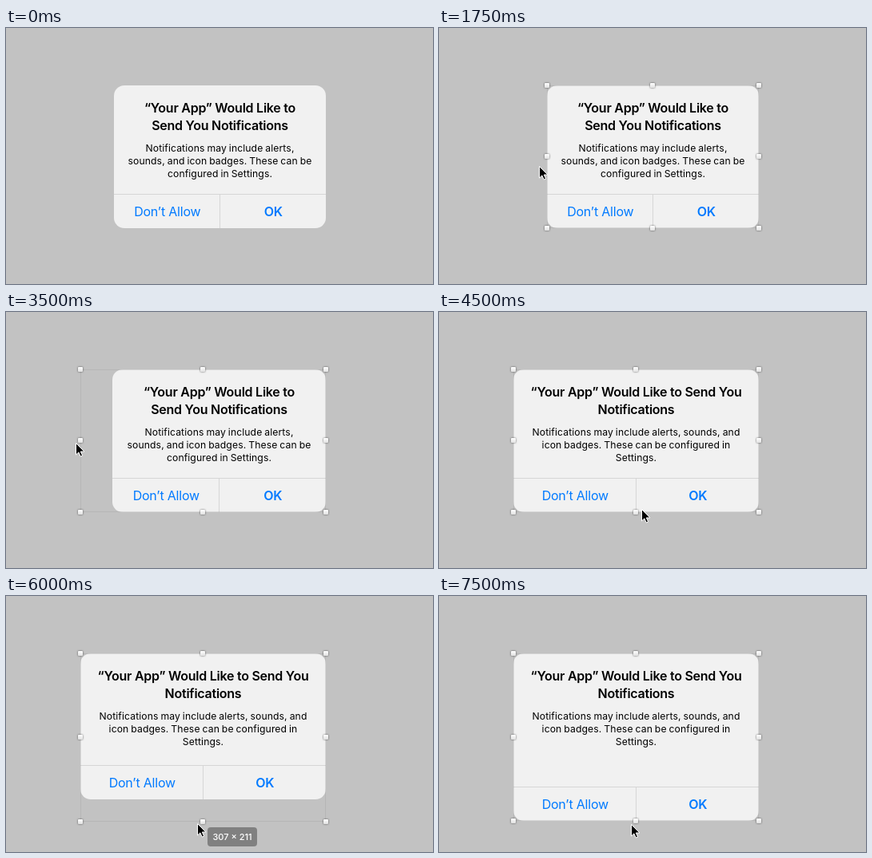
Recreate the animation shown at these times as an HTML page. Size 534 by 321 pixels, loop 8000 ms.

```html
<!DOCTYPE html>
<html lang="en">
<head>
<meta charset="utf-8">
<title>Resizing an alert</title>
<style>
  html, body { margin: 0; width: 100%; height: 100%; overflow: hidden; background: #c2c2c2; }
  svg { display: block; width: 534px; height: 321px; }
  text { font-family: Inter, Roboto, sans-serif; text-anchor: middle; }
  .title { font-size: 16px; font-weight: 600; letter-spacing: -.25px; }
  .body { font-size: 12.2px; letter-spacing: .1px; word-spacing: -.6px; }
  .button { font-size: 16px; letter-spacing: -.22px; fill: #007aff; }
  .strong { font-weight: 600; }
  .size { font-size: 11px; font-weight: 500; fill: #fff; }
  .rule { stroke: #d6d6d6; }
  .outline { fill: none; stroke: #999; stroke-opacity: .3; }
  .handle { fill: url(#shine); filter: drop-shadow(.5px .5px .8px #0009); }
  .cursor { fill: #000; stroke: #fff; stroke-linejoin: round; }
</style>
</head>
<body>
<svg viewBox="0 0 534 321">
  <defs>
    <linearGradient id="shine" x2="0" y2="1">
      <stop stop-color="#fff"/><stop offset="1" stop-color="#e0e0e0"/>
    </linearGradient>
  </defs>
  <g id="scene"></g>
</svg>
<script>
const LOOP = 8000, TOP = 72, RIGHT = 400;
const scene = document.getElementById('scene');

// Each entry overrides the pose before it.
// left/bottom: selection edges, cardLeft/cardBottom: the alert, which redraws late
const changes = [
  [0, { left: 135, bottom: 251, cardLeft: 135, cardBottom: 251 }],
  [500, { cursor: [487, 208] }],
  [750, { cursor: [418, 204] }],
  [1000, { cursor: [318, 198] }],
  [1250, { cursor: [272, 193], selected: true }],
  [1500, { cursor: [199, 179] }],
  [1750, { cursor: [125, 173] }],
  [2000, { cursor: [127, 165] }],
  [2500, { cursor: [126, 164], left: 133, label: true }],
  [2750, { cursor: [106, 164], left: 113, topLeft: 133 }],
  [3000, { cursor: [88, 164], left: 95 }],
  [3250, { cursor: [87, 164], left: 93, topLeft: 0 }],
  [3500, { cardLeft: 133, label: false }],
  [3750, { cursor: [92, 170], cardLeft: 93 }],
  [4000, { cursor: [142, 206] }],
  [4250, { cursor: [216, 238] }],
  [4500, { cursor: [253, 247] }],
  [4750, { cursor: [242, 251] }],
  [5000, { cursor: [240, 254] }],
  [5500, { cursor: [239, 257], bottom: 255, cardBottom: 255, label: true }],
  [5750, { cursor: [239, 275], bottom: 273 }],
  [6000, { cursor: [239, 285], bottom: 283 }],
  [6500, { cursor: [240, 286], bottom: 282 }],
  [6750, { cardBottom: 282 }],
  [7000, { label: false }]
];

const text = (kind, x, y, words) => `<text class="${kind}" x="${x}" y="${y}">${words}</text>`;
const rect = (x, y, w, h, attrs) => `<rect x="${x}" y="${y}" width="${w}" height="${h}" ${attrs}/>`;
const middle = (a, b) => Math.floor((a + b) / 2);

function alertBox({ cardLeft: x, cardBottom: bottom }) {
  const w = RIGHT - x, mid = x + w / 2, ruleY = bottom - 42.5, ruleX = Math.floor(mid) + .5;
  const wide = w > 280;
  const title = wide
    ? ['“Your App” Would Like to Send You', 'Notifications']
    : ['“Your App” Would Like to', 'Send You Notifications'];
  const body = wide
    ? ['Notifications may include alerts, sounds, and', 'icon badges. These can be configured in', 'Settings.']
    : ['Notifications may include alerts,', 'sounds, and icon badges. These can be', 'configured in Settings.'];
  return rect(x, TOP, w, bottom - TOP, 'rx="13" fill="#f1f1f1"') +
    title.map((line, i) => text('title', mid, 106 + 22 * i, line)).join('') +
    body.map((line, i) => text('body', mid, 155 + 16 * i, line)).join('') +
    `<path class="rule" d="M${x} ${ruleY}H${RIGHT}M${ruleX} ${ruleY}V${bottom}"/>` +
    text('button', x + w / 4 + .5, bottom - 15, 'Don’t Allow') +
    text('button strong', x + w * .75 + .5, bottom - 15, 'OK');
}

function selection({ left, bottom, topLeft }) {
  const top = topLeft || left, midY = middle(TOP, bottom);
  const handles = [
    [top, TOP], [middle(top, RIGHT), TOP], [RIGHT, TOP],
    [left, midY], [RIGHT, midY],
    [left, bottom], [middle(left, RIGHT), bottom], [RIGHT, bottom]
  ];
  return rect(left + .5, TOP + .5, RIGHT - left - 1, bottom - TOP - 1, 'class="outline"') +
    handles.map(([x, y]) => rect(x - 3, y - 3, 6, 6, 'rx="1" class="handle"')).join('');
}

function sizeLabel({ cursor: [x, y], left, bottom }) {
  return rect(x + 13, y + 5, 62, 24, 'rx="4" fill="#464646" fill-opacity=".52"') +
    text('size', x + 44, y + 21, `${RIGHT - left} × ${bottom - TOP}`);
}

const pointer = ([x, y]) =>
  `<path class="cursor" transform="translate(${x + .5} ${y + .5})" d="M0 0V14.5l3.4-3.1 2.3 5.2 2.4-1-2.3-5.1H10.4Z"/>`;

function draw(time) {
  const pose = Object.assign({}, ...changes.filter(([at]) => at <= time).map(([, change]) => change));
  scene.innerHTML = alertBox(pose) +
    (pose.selected ? selection(pose) : '') +
    (pose.label ? sizeLabel(pose) : '') +
    (pose.cursor ? pointer(pose.cursor) : '');
}

let shown = -1;
function tick() {
  const time = performance.now() % LOOP;
  const step = Math.floor(time / 250);
  if (step !== shown) draw(time);
  shown = step;
  requestAnimationFrame(tick);
}
tick();
</script>
</body>
</html>
```
